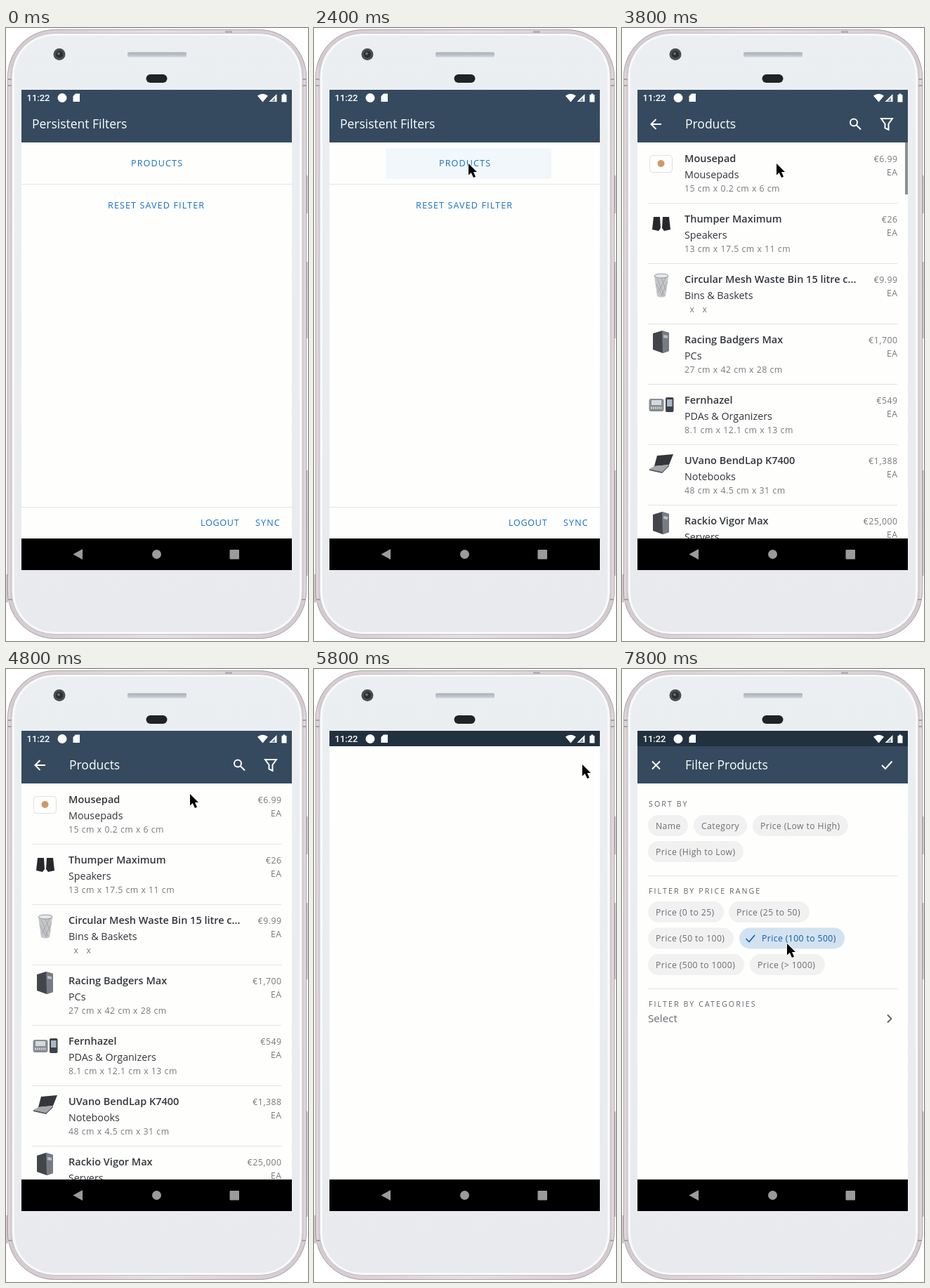
Recreate the animation shown at these times as an HTML page. Size 430x873 px, loop 8000 ms.

```html
<!DOCTYPE html>
<html lang="en">
<head>
<meta charset="utf-8">
<title>Persistent Filters</title>
<style>
html, body { margin: 0; width: 100%; height: 100%; overflow: hidden; background: #fff; }
svg { display: block; width: 100%; height: 100%; }
text { font-family: "Open Sans", "Noto Sans", sans-serif; white-space: pre; }
.clock { font: 500 13px Roboto, sans-serif; fill: #fff; }
.title { font-size: 17.5px; fill: #fff; }
.button { font-size: 12.6px; letter-spacing: 1.1px; fill: #1870c5; }
.name { font-size: 14.5px; font-weight: 600; fill: #32363a; }
.kind { font-size: 14.3px; fill: #32363a; }
.note { font-size: 12.3px; letter-spacing: .5px; fill: #77797c; }
.end { text-anchor: end; }
.head { font-size: 10.6px; letter-spacing: 2.1px; fill: #606367; }
.chip { font-size: 12.2px; letter-spacing: .42px; fill: #6a6d70; }
.select { font-size: 15.2px; fill: #6a6d70; }
.icon { fill: none; stroke: #fff; stroke-width: 2; }
</style>
</head>
<body>
<svg id="stage" viewBox="0 0 430 873">
  <defs>
    <linearGradient id="face" x2="0" y2="1">
      <stop offset="0" stop-color="#eceff2"/><stop offset="1" stop-color="#e8eaed"/>
    </linearGradient>
    <linearGradient id="metal">
      <stop offset="0" stop-color="#e9e1e4"/><stop offset=".012" stop-color="#d3cace"/>
      <stop offset=".5" stop-color="#e6dfe2"/>
      <stop offset=".988" stop-color="#d3cace"/><stop offset="1" stop-color="#e9e1e4"/>
    </linearGradient>
    <linearGradient id="grille" x2="0" y2="1">
      <stop offset="0" stop-color="#a9adb5"/><stop offset="1" stop-color="#cfd3da"/>
    </linearGradient>
    <clipPath id="screen"><path d="M22 88H407V727H22Z"/></clipPath>
  </defs>

  <g id="phone">
    <path d="M428.5 210v54M428.5 333v109M428.5 630v150M1.5 778v40" stroke="#b9b1b5" stroke-width="2"/>
    <rect x="2.5" y="2.5" width="425" height="867" rx="67" fill="url(#metal)" stroke="#a9a1a5"/>
    <path d="M3 73h7M3 82h7M420 73h7M420 82h7M312 5.500h10M3 814h7M420 814h7" stroke="#a7a0a4" stroke-width="2"/>
    <rect x="8" y="7.500" width="414" height="856" rx="61" fill="#f8f9fb" stroke="#c6bec2"/>
    <rect x="12" y="11" width="406" height="849" rx="57" fill="url(#face)"/>
    <circle cx="76" cy="37.500" r="8.500" fill="#4b4d51"/>
    <circle cx="76" cy="37.500" r="5" fill="#2b2d31"/>
    <circle cx="75" cy="36.500" r="2" fill="#667078"/>
    <rect x="173" y="34.500" width="84" height="7" rx="2" fill="url(#grille)"/>
    <rect x="199.500" y="66" width="30" height="12" rx="6" fill="#222326"/>
    <path d="M22 88H407V772H22Z" fill="#fefefd"/>
  </g>

  <g clip-path="url(#screen)">
    <path id="bar" d="M22 88H407V163H22Z" fill="#354a5f"/>
    <path id="darkStatus" d="M22 88H407V110H22Z" fill="#22313f"/>
    <text class="clock" x="29.500" y="104">11:22</text>
    <g fill="#fff">
      <circle cx="80" cy="99.500" r="6.500"/>
      <path d="M99 93.500h6v11.500h-9.500v-8zM358 96.500q7.500-5.500 15 0L365.500 105.500ZM392.500 95h2v-1.500h3v1.500h2v10.500h-7z"/>
      <path d="M385.500 94V105H374.500Z"/>
      <path d="M383 99v5.200h-5.200z" fill="#8190a0"/>
    </g>
    <g id="home"></g>
    <g id="products"></g>
    <g id="filter"></g>
  </g>

  <path d="M22 727H407V772H22Z"/>
  <g fill="#9b9b9b">
    <path d="M109 742v15L95.500 749.500Z"/><circle cx="214.500" cy="749.500" r="6.500"/>
    <rect x="318.500" y="743" width="13.500" height="13.500" rx="1"/>
  </g>

  <path id="cursor" d="M0 0V16.500L3.800 13L7 20L10 18.700L7 12H12Z" stroke="#fff" stroke-width="1.300" stroke-linejoin="round" paint-order="stroke"/>
</svg>

<script>
const $ = id => document.getElementById(id);
const text = (cls, x, y, s) => `<text class="${cls}" x="${x}" y="${y}">${s.replace(/&/g, '&amp;').replace(/>/g, '&gt;')}</text>`;
const rule = (y, from = 37, to = 392) => `<path d="M${from} ${y}.5H${to}" stroke="#e4e4e4"/>`;
const icon = d => `<path class="icon" d="${d}"/>`;

$('home').innerHTML =
  text('title', 37, 143, 'Persistent Filters') +
  '<rect id="press" x="102" y="171" width="236" height="44" rx="3"/>' +
  text('button', 178, 197, 'PRODUCTS') + rule(222, 22, 407) +
  text('button', 145, 257, 'RESET SAVED FILTER') + rule(682, 22, 407) +
  text('button" style="letter-spacing:.7px', 277, 709, 'LOGOUT') +
  text('button', 355, 709, 'SYNC');

// Thumbnails are drawn relative to the top left of their row.
const tower = `<path d="M44 14l13-4 10 3v26l-9 3-14-5z" fill="#42464b"/>
  <path d="M57 10l10 3v26l-9 3z" fill="#777c82"/><path d="M59 16l6 1v4l-6-1z" fill="#b9bec3"/>`;
const thumbs = {
  pad: `<rect x="39.500" y="18.500" width="32" height="24" rx="4" fill="#fff" stroke="#e1e1e3"/>
    <circle cx="55.500" cy="30" r="5" fill="#d39766"/>`,
  speakers: `<path d="M45 20h9l1 16-3 4-9-2zM58 20h9l2 18-9 2-3-4z" fill="#27282b"/>`,
  bin: `<path d="M46 18l4 29q6 3 12 0l4-29z" fill="#c4c6c8"/>
    <path d="M50 22l10 24M56 21l7 18M62 21l-11 21M65 26l-9 20M48 29l10 18" stroke="#a5a8ab"/>
    <ellipse cx="56" cy="18" rx="10" ry="3" fill="#e7e8e9" stroke="#95989b"/>`,
  tower,
  handhelds: `<rect x="38.500" y="21" width="21" height="18" rx="3" fill="#888d92"/>
    <path d="M42 23h14v7h-14z" fill="#d5dae0"/><path d="M41 34h16" stroke="#d0d2d5" stroke-width="3" stroke-dasharray="2 1"/>
    <rect x="62" y="19" width="11.500" height="21" rx="2" fill="#3e4349"/><path d="M64 22h7.500v10h-7.500z" fill="#a9b8c5"/>`,
  laptop: `<path d="M50 16l23-2-6 15-21 2z" fill="#33363b"/>
    <path d="M46 31l21-2-10 10-18-4z" fill="#a3a7ac"/><path d="M39 35l18 4 10-10v2l-10 10-18-4z" fill="#55595e"/>`
};
const items = [
  ['pad', 'Mousepad', 'Mousepads', '15 cm x 0.2 cm x 6 cm', '€6.99'],
  ['speakers', 'Thumper Maximum', 'Speakers', '13 cm x 17.5 cm x 11 cm', '€26'],
  ['bin', 'Circular Mesh Waste Bin 15 litre c...', 'Bins & Baskets', '  x   x', '€9.99'],
  ['tower', 'Racing Badgers Max', 'PCs', '27 cm x 42 cm x 28 cm', '€1,700'],
  ['handhelds', 'Fernhazel', 'PDAs & Organizers', '8.1 cm x 12.1 cm x 13 cm', '€549'],
  ['laptop', 'UVano BendLap K7400', 'Notebooks', '48 cm x 4.5 cm x 31 cm', '€1,388'],
  ['tower', 'Rackio Vigor Max', 'Servers', '', '€25,000']
];
const row = ([thumb, name, kind, size, price], i) => `<g transform="translate(0 ${163 + 86 * i})">` +
  thumbs[thumb] + text('name', 89, 28, name) + text('kind', 89, 50.5, kind) + text('note', 89, 70, size) +
  text('note end', 392.5, 27.5, price) + text('note end', 392.5, 46.5, 'EA') + rule(86) + '</g>';

$('products').innerHTML =
  '<circle id="hover" cx="377" cy="137" r="16.500" fill="#2c3e50"/>' +
  icon('M56 137H42M48.500 130L41.500 137L48.500 144') + text('title', 90, 143, 'Products') +
  icon('M334 138.500L340 144.500') + '<circle class="icon" cx="330" cy="134.500" r="5"/>' +
  icon('M369 129H385L379.500 136.500V145L374.500 142.500V136.500Z') +
  `<g id="list">${items.map(row).join('')}
    <path id="scroll" d="M403 163h4v74h-4z" fill="#8d8e90"/></g>`;

const chip = (x, y, right, label) =>
  `<rect x="${x}" y="${y - 15}" width="${right - x}" height="30" rx="15" fill="#f1f1f2"/>` + text('chip', x + 11, y + 4.5, label);

$('filter').innerHTML =
  icon('M43 131.500L54 142.500M54 131.500L43 142.500') + text('title', 90, 143, 'Filter Products') +
  icon('M370 137L375 142L384.500 131.500') +
  text('head', 38, 196, 'SORT BY') +
  chip(37, 223, 94, 'Name') + chip(102, 223, 178, 'Category') + chip(186, 223, 322, 'Price (Low to High)') +
  chip(37, 260, 173, 'Price (High to Low)') + rule(294) +
  text('head', 38, 319.5, 'FILTER BY PRICE RANGE') +
  chip(37, 346, 145, 'Price (0 to 25)') + chip(152, 346, 267, 'Price (25 to 50)') +
  chip(37, 383.5, 159, 'Price (50 to 100)') +
  `<g id="plain">${chip(167, 383.5, 297, 'Price (100 to 500)')}</g>
   <g id="chosen"><rect x="167" y="368.500" width="150" height="30" rx="15" fill="#d3e2f1"/>
   <path d="M176.500 384L181 388.500L189 379" fill="none" stroke="#0f5cab" stroke-width="1.600"/>
   <text class="chip" x="199" y="388" style="fill:#0f5cab">Price (100 to 500)</text></g>` +
  chip(37, 421, 174, 'Price (500 to 1000)') + chip(182, 421, 289, 'Price (> 1000)') + rule(455) +
  text('head', 38, 480.5, 'FILTER BY CATEGORIES') + text('select', 37, 503, 'Select') +
  '<path d="M378 492.500L383.500 498L378 503.500" fill="none" stroke="#5d6063" stroke-width="1.800"/>';

// Cursor path: time, x, y
const path = [
  [1600, 400, 420], [2200, 220, 193], [4600, 220, 193], [5200, 382, 136],
  [6400, 382, 136], [6600, 355, 306], [7000, 235, 391], [8000, 235, 391]
];
function cursorAt(t) {
  const i = Math.max(1, path.findIndex(p => p[0] >= t));
  const [t0, x0, y0] = path[i - 1], [t1, x1, y1] = path[i];
  const k = Math.max(0, (t - t0) / (t1 - t0)), ease = k * k * (3 - 2 * k);
  return [x0 + (x1 - x0) * ease, y0 + (y1 - y0) * ease];
}

const show = (id, on) => { $(id).style.display = on ? '' : 'none'; };
const LOOP = 8000, STEP = 200;

function draw(t) {
  show('home', t < 2800);
  show('products', t >= 2800 && t < 5800);
  show('list', t >= 3000);
  show('bar', t < 5800 || t >= 6000);
  show('darkStatus', t >= 5800);
  show('filter', t >= 6000);
  show('press', t >= 2200);
  $('press').setAttribute('fill', t < 2600 ? '#f2f7fc' : '#dce9f6');
  show('hover', t >= 5200);
  $('scroll').style.opacity = Math.min(1, Math.max(0, (4400 - t) / 400));
  show('plain', t < 7600);
  show('chosen', t >= 7600);
  show('cursor', t >= 1600);
  $('cursor').setAttribute('transform', `translate(${cursorAt(t).map(Math.round)})`);
}

const start = performance.now();
function tick(now) {
  const t = Math.max(0, now - start) % LOOP;
  draw(Math.floor(t / STEP) * STEP);
  requestAnimationFrame(tick);
}
draw(0);
requestAnimationFrame(tick);
</script>
</body>
</html>
```
